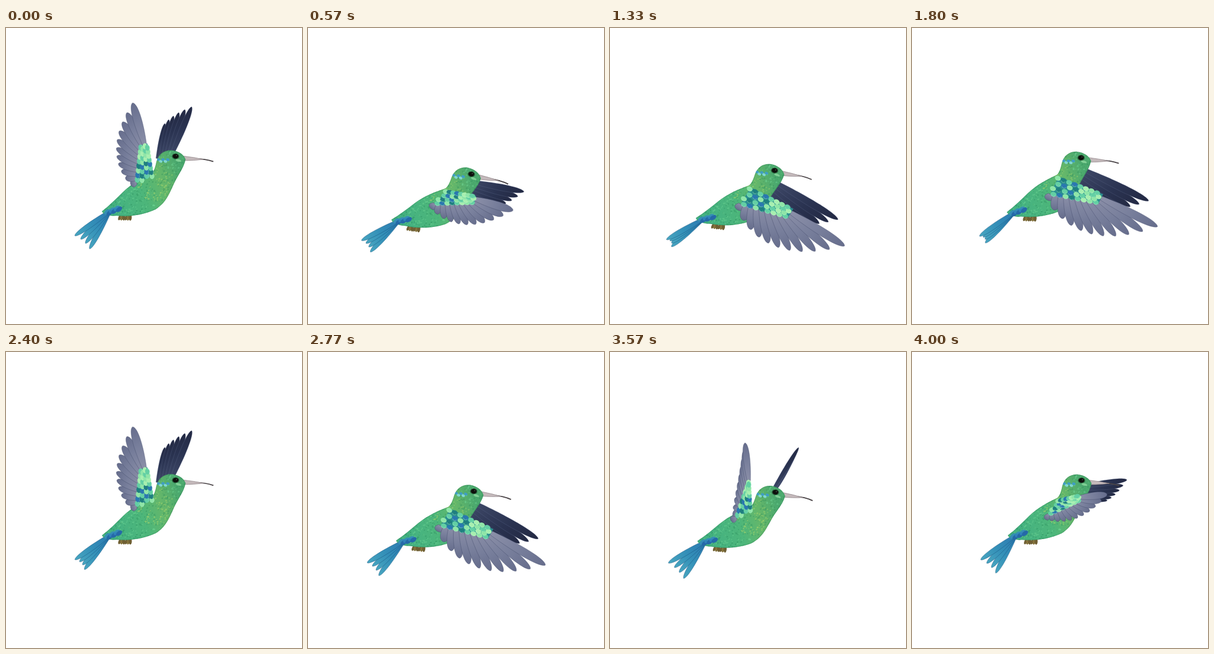
Write an HTML page with a canvas that moves like this. It is 500 by 500 pixels and loops after 4060 ms.

```html
<!DOCTYPE html>
<html lang="en">
<head>
<meta charset="utf-8">
<title>Hummingbird</title>
<style>
  html, body { margin: 0; width: 100%; height: 100%; overflow: hidden; background: #fff; }
  canvas { display: block; width: 500px; height: 500px; }
</style>
</head>
<body>
<canvas id="stage" width="500" height="500"></canvas>
<script>
const ctx = document.getElementById('stage').getContext('2d');
const LOOP = 4060, STEPS = 101, BEAT = 6;
const TAU = Math.PI * 2;
const EYE = [286, 217];
const SHOULDER = [249, 250];
const FAR_ROOT = [274, 229];

// Height of the hover over the loop: 0 is high and upright, 1 is low and level
const hover = [[0, 0.05], [16, 1], [23, 1.05], [54, -0.1], [80, 1.05], [101, 0.05]];

const slate = { root: '#8b8fa8', mid: '#777e9b', tip: '#666d8c', line: 'rgba(66,74,106,.6)', under: '#727995' };
const navy = { root: '#3d4766', mid: '#2a3351', tip: '#232943', line: 'rgba(110,122,158,.35)', under: '#2b3452' };
const azure = { root: '#2b78b0', mid: '#3490b8', tip: '#48a6c0', line: 'rgba(20,75,120,.6)' };
const scaleInk = ['#8fe5a8', '#1f7f80', '#63cfa4', '#2a78b0', '#a8efb0'];

const mix = (a, b, k) => a + (b - a) * k;
const between = (p, q, k) => [mix(p[0], q[0], k), mix(p[1], q[1], k)];
const onCurve = (a, c, b, k) => between(between(a, c, k), between(c, b, k), k);
const along = (p, v, k) => [p[0] + v[0] * k, p[1] + v[1] * k];
const perp = v => [-v[1], v[0]];
const rad = deg => deg * Math.PI / 180;
const ease = k => (1 - Math.cos(k * Math.PI)) / 2;

function makeRandom(seed) {
  return () => {
    seed = (seed * 1664525 + 1013904223) >>> 0;
    return seed / 4294967296;
  };
}

const rnd = makeRandom(41);
const specks = Array.from({ length: 1000 }, () => ({
  x: 155 + rnd() * 152, y: 204 + rnd() * 118, r: 0.5 + rnd() * 0.9, tone: rnd()
}));

const body = new Path2D(
  'M303 222 C300 214 291 208 279 207 C265 207 257 215 254 226 C252 236 250 243 246 247 ' +
  'C228 256 212 265 198 279 C187 290 176 302 163 312 C166 318 177 320 188 319 ' +
  'C211 321 236 316 254 307 C271 296 276 281 282 268 C289 250 300 238 303 222 Z');

function ellipse(x, y, rx, ry, fill, turn = 0) {
  ctx.fillStyle = fill;
  ctx.beginPath();
  ctx.ellipse(x, y, rx, ry, turn, 0, TAU);
  ctx.fill();
}

function shape(points, fill) {
  ctx.beginPath();
  points.forEach(p => ctx.lineTo(...p));
  ctx.closePath();
  ctx.fillStyle = fill;
  ctx.fill();
}

function feather(root, tip, half, ink) {
  const d = [tip[0] - root[0], tip[1] - root[1]];
  const side = perp(d).map(v => v / (Math.hypot(...d) || 1) * half);
  const at = (k, s) => along(along(root, d, k), side, s);
  const shade = ctx.createLinearGradient(...root, ...tip);
  shade.addColorStop(0, ink.root);
  shade.addColorStop(0.55, ink.mid);
  shade.addColorStop(1, ink.tip);
  ctx.beginPath();
  ctx.moveTo(...at(0, 0.45));
  ctx.bezierCurveTo(...at(0.5, 1.1), ...at(0.96, 1.05), ...tip);
  ctx.bezierCurveTo(...at(0.96, -1.05), ...at(0.5, -1.1), ...at(0, -0.45));
  ctx.closePath();
  ctx.fillStyle = shade;
  ctx.fill();
  ctx.strokeStyle = ink.line;
  ctx.lineWidth = 0.7;
  ctx.stroke();
}

// Feathers spread from the line wrist-inner to the curve first-bend-last
function fan(wrist, inner, first, bend, last, count, half, ink) {
  const quills = Array.from({ length: count }, (_, i) => {
    const k = i / (count - 1);
    return [between(wrist, inner, k), onCurve(first, bend, last, k)];
  });
  shape([wrist, ...quills.map(([root, tip]) => between(root, tip, 0.6)), inner], ink.under);
  for (let i = count - 1; i >= 0; i--) {
    const [root, tip] = quills[i];
    const next = quills[i ? i - 1 : 1][1];
    const gap = Math.hypot(tip[0] - next[0], tip[1] - next[1]);
    feather(root, tip, Math.min(gap * 0.48, half), ink);
  }
}

// Projected span of a wing: an ellipse with a faster second swing
function swing(mid, reach, lag, dip, turn) {
  return mid.map((m, i) =>
    m + reach[i] * Math.cos(turn) + lag[i] * Math.sin(turn) + dip[i] * Math.cos(2 * turn));
}

// Side on which the feathers trail: -1 with the wing raised, about 1 with it lowered
const flip = turn => 0.4 - Math.cos(turn) - 0.4 * Math.cos(2 * turn);

function farWing(turn) {
  const span = swing([77, -35], [-45, -77], [9, 11], [6, 16], turn);
  const chord = perp(span).map(v => v * flip(turn));
  const tip = along(FAR_ROOT, span, 1);
  const last = along(along(FAR_ROOT, span, 0.58), chord, 0.3);
  const bend = along(between(tip, last, 0.5), chord, 0.08);
  fan(along(FAR_ROOT, span, 0.15), along(FAR_ROOT, chord, 0.2), tip, bend, last, 6, 7, navy);
}

function nearWing(turn) {
  const span = swing([53, -38], [-103, -101], [20, 16], [13, 17], turn);
  const chord = perp(span).map(v => v * flip(turn));
  const tuck = [-28 - 10 * Math.cos(turn), 28 - 12 * Math.cos(turn)];
  const tip = along(SHOULDER, span, 1);
  const last = along(SHOULDER, tuck, 1);
  const wrist = along(SHOULDER, span, 0.43);
  const inner = along(SHOULDER, tuck, 0.75);
  const bend = along(between(tip, last, 0.5), chord, 0.42);
  fan(wrist, inner, tip, bend, last, 11, 8, slate);
  coverts([SHOULDER, along(wrist, chord, -0.04)], [inner, along(wrist, chord, 0.05)]);
}

function coverts(upper, lower) {
  const rows = 4, cols = 8;
  shape([...upper, ...[...lower].reverse()], '#2b8f90');
  const lean = Math.atan2(upper[1][1] - upper[0][1], upper[1][0] - upper[0][0]);
  for (let j = rows - 1; j >= 0; j--) {
    for (let i = 0; i < cols; i++) {
      const k = (i + j % 2 * 0.5) / cols;
      const [x, y] = between(between(...upper, k), between(...lower, k), (j + 0.3) / (rows - 0.6));
      const ink = scaleInk[i < 4 ? (i + j * 2) % 4 : (i + j) % 3 * 2];
      ellipse(x, y, 5.2, 3.9, ink, lean);
      ctx.strokeStyle = 'rgba(190,250,205,.55)';
      ctx.lineWidth = 0.8;
      ctx.beginPath();
      ctx.arc(x, y, 3.8, lean + 0.3, lean + 2.6);
      ctx.stroke();
    }
  }
}

function drawTail(low) {
  const root = [177, 311];
  for (let i = 0; i < 4; i++) {
    const turn = rad(mix(low, 144, i / 3));
    feather(root, along(root, [Math.cos(turn), Math.sin(turn)], i % 3 ? 69 : 73), 5, azure);
  }
}

function drawFeet() {
  for (const x of [197, 208]) {
    for (let i = -1; i < 2; i++) ellipse(x + i * 3, 321, 2.6, 6, i ? '#6f5f33' : '#85733c', rad(12 - i * 14));
  }
}

function drawBeak() {
  ctx.strokeStyle = '#4a4447';
  ctx.lineWidth = 1.8;
  ctx.beginPath();
  ctx.moveTo(318, 220.5);
  ctx.quadraticCurveTo(337, 220.5, 350, 225);
  ctx.stroke();
  ctx.fillStyle = '#c4b9bb';
  ctx.beginPath();
  ctx.moveTo(299, 216.5);
  ctx.quadraticCurveTo(316, 218, 333, 221.5);
  ctx.quadraticCurveTo(315, 224, 301, 224);
  ctx.fill();
  ctx.strokeStyle = '#8d8286';
  ctx.lineWidth = 0.7;
  ctx.stroke();
}

function drawBody() {
  const coat = ctx.createLinearGradient(175, 285, 290, 240);
  coat.addColorStop(0, '#44b282');
  coat.addColorStop(0.45, '#4db67a');
  coat.addColorStop(0.75, '#65b76a');
  coat.addColorStop(1, '#4ca96e');
  ctx.save();
  ctx.fillStyle = coat;
  ctx.fill(body);
  ctx.clip(body);
  for (const s of specks) {
    const chest = Math.hypot(s.x - 256, s.y - 266) < 34;
    const light = chest ? 'rgba(165,212,108,.55)' : 'rgba(112,214,150,.45)';
    ellipse(s.x, s.y, s.r * 1.3, s.r, s.tone < 0.5 ? light : 'rgba(38,135,88,.35)', -0.6);
  }
  ctx.strokeStyle = 'rgba(35,115,72,.3)';
  ctx.lineWidth = 2;
  ctx.stroke(body);
  for (let i = 0; i < 5; i++) {
    ellipse(257 + i * 4, 223 + (i % 2) * 3, 3, 2.2, i % 2 ? '#7fd6d0' : '#3f9ec5', 0.3);
  }
  ellipse(291, 224, 5, 2, 'rgba(145,220,160,.75)', 0.3);
  ctx.restore();
  for (let i = 0; i < 6; i++) {
    ellipse(172 + i * 4, 313 - i * 1.6 + (i % 2) * 3, 6, 3.6, i % 2 ? '#2569a8' : 'rgba(50,135,190,.85)', -0.7);
  }
  ellipse(286, 217, 6.4, 5, 'rgba(28,70,42,.65)');
  ellipse(286, 217, 4.8, 3.9, '#0d0f0c');
  ellipse(287.5, 215.8, 0.8, 0.7, '#69736a');
}

function hoverAt(step) {
  const i = hover.findIndex(([end]) => end > step);
  const [from, a] = hover[i - 1], [to, b] = hover[i];
  return mix(a, b, ease((step - from) / (to - from)));
}

function render(time) {
  // 25 steps a second shown on a grid of 30, so every fifth step stays twice as long
  const slot = Math.floor((time % LOOP + 4) * 0.03);
  const step = Math.min(STEPS - 1, Math.floor(slot * 5 / 6));
  const sink = hoverAt(step);
  const turn = step % BEAT / BEAT * TAU;

  ctx.fillStyle = '#fff';
  ctx.fillRect(0, 0, 500, 500);
  ctx.save();
  ctx.translate(287 - 11.5 * sink, 215 + 33 * sink);
  ctx.rotate(rad(0.5 + 7.8 * sink));
  ctx.translate(-EYE[0], -EYE[1]);
  farWing(turn);
  drawTail(124 + 9 * Math.cos((step - 38) / STEPS * TAU));
  drawFeet();
  drawBeak();
  drawBody();
  nearWing(turn);
  ctx.restore();
}

const start = performance.now();
function tick() {
  render(performance.now() - start);
  requestAnimationFrame(tick);
}
tick();
</script>
</body>
</html>
```
